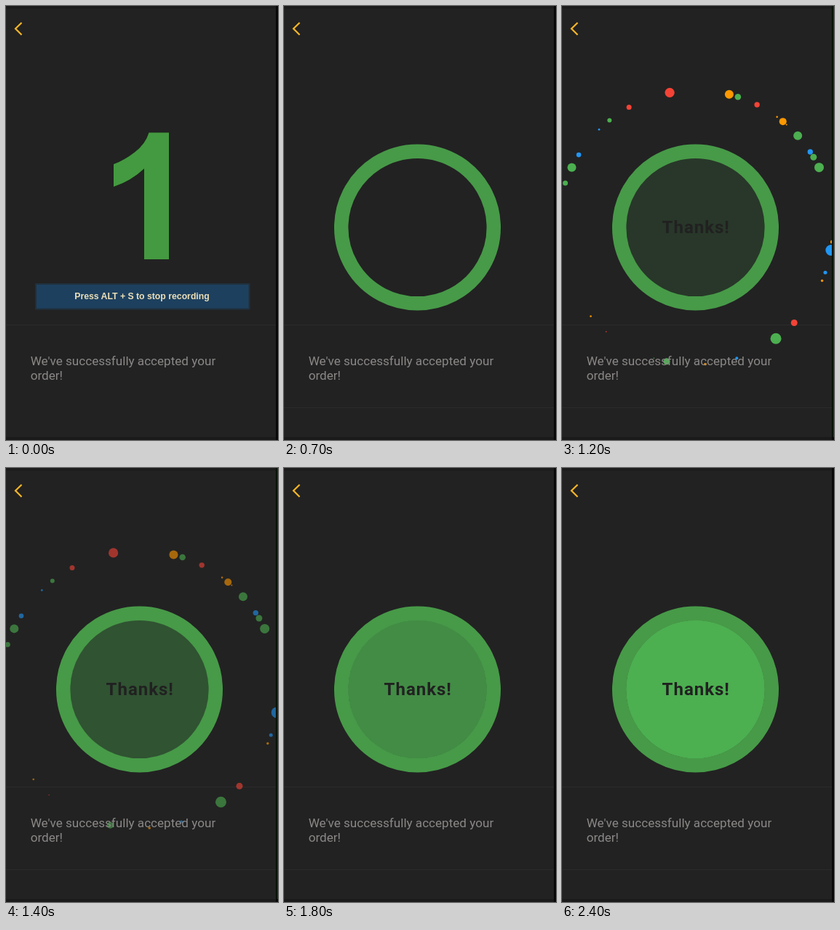
An HTML page that plays this animation: 374x598 px, repeating every 2500 ms.

```html
<!DOCTYPE html>
<html lang="en">
<head>
<meta charset="utf-8">
<title>Order accepted</title>
<style>
  html, body { margin: 0; width: 100%; height: 100%; overflow: hidden; background: #222; }
  svg { display: block; width: 374px; height: 598px; }
  .message { font: 17.1px Roboto, sans-serif; fill: #8b8887; }
  .thanks { font: bold 24px Roboto, sans-serif; letter-spacing: 1px; fill: #212121; }
  .hint { font: bold 12.25px "Liberation Sans", Arial, sans-serif; fill: #ecdfb8; text-anchor: middle; }
</style>
</head>
<body>
<svg viewBox="0 0 374 598">
  <rect width="374" height="598" fill="#222"/>
  <rect width="374" height="3.5" fill="#1b1b1b"/>
  <rect y="594" width="374" height="4" fill="#1a1a1a"/>
  <path d="M21.5 23 13 31.2l8.5 8.5" fill="none" stroke="#fbb726" stroke-width="2.2"/>
  <path id="divider" stroke="#2b2b2b"/>
  <path id="lowerDivider" d="M0 553.5H371" stroke="#2b2b2b"/>

  <g id="dots"></g>
  <circle id="disc" cx="183.5" cy="305" r="95.5" fill="#4caf50"/>
  <path id="ring" fill="none" stroke="#479a48" stroke-width="19.4"/>
  <text id="thanks" class="thanks" x="137.6" y="313">Thanks!</text>

  <text class="message" x="33.7" y="495">We've successfully accepted your</text>
  <text class="message" x="33.7" y="515">order!</text>

  <g id="countdown">
    <path d="M224 174.5V349H190V224Q172 241 148 249V218Q162 213 177 201.500 192 190 196.500 174.500Z"
          fill="#449a40" stroke="#1c281c" stroke-width="1.500" paint-order="stroke"/>
    <rect x="41" y="383" width="293.500" height="34.500" fill="#1d405f" stroke="#20303e" stroke-width="2"/>
    <text class="hint" x="187" y="404">Press ALT + S to stop recording</text>
  </g>

  <rect x="371" width="3" height="598" fill="#080808"/>
  <rect id="edge" x="372.500" width="1.500" height="594" fill="#063f06"/>
</svg>
<script>
const LOOP = 2500, STEP = 100;
const CENTER = { x: 183.5, y: 305 }, RING_RADIUS = 104.8, BURST_RADIUS = 192;

// Each dot: angle in degrees, radius
const BURST = {
  '#4caf50': [[-72, 4.3], [-41.9, 6], [-30.8, 4.5], [-25.9, 6.5], [54.2, 7.5], [102.1, 4.5],
              [107.6, .8], [-161.2, 3.5], [-154.1, 6], [-128.7, 3]],
  '#f44336': [[-100.8, 6.6], [-63.4, 3.7], [44.1, 4.5], [130.5, .8], [-118.9, 3.5]],
  '#ff9800': [[-75.8, 6], [-53.6, 1.3], [-50.5, 5], [-48.5, 1], [6.1, 2.5], [22.9, 1.7],
              [85.9, 1.8], [139.6, 1.3]],
  '#2196f3': [[-33.4, 3.7], [9.6, 7.5], [19.2, 2.5], [72.5, 2], [-148.1, 3.3], [-134.5, 1.4]]
};

const $ = id => document.getElementById(id);
const clamp = v => Math.max(0, Math.min(1, v));
const progress = (t, start, length) => clamp((t - start) / length);
const show = (id, visible) => $(id).setAttribute('visibility', visible ? 'visible' : 'hidden');

const dots = Object.entries(BURST).flatMap(([fill, list]) => list.map(([degrees, r]) => {
  const node = document.createElementNS('http://www.w3.org/2000/svg', 'circle');
  node.setAttribute('r', r);
  node.setAttribute('fill', fill);
  $('dots').append(node);
  return { node, angle: degrees * Math.PI / 180 };
}));

// Clockwise arc that starts at the bottom of the circle
function arcPath(part) {
  if (part <= 0) return '';
  const point = turn => {
    const a = Math.PI / 2 + turn * 2 * Math.PI;
    return `${CENTER.x + RING_RADIUS * Math.cos(a)} ${CENTER.y + RING_RADIUS * Math.sin(a)}`;
  };
  const arc = turn => `A${RING_RADIUS} ${RING_RADIUS} 0 0 1 ${point(turn)}`;
  return `M${point(0)}${arc(part / 3)}${arc(part * 2 / 3)}${arc(part)}${part === 1 ? 'Z' : ''}`;
}

function drawBurst(t) {
  const distance = BURST_RADIUS * (1 - Math.exp(-(t - 700) / 120));
  $('dots').setAttribute('opacity', 1 - progress(t, 1200, 500));
  show('dots', t > 700 && t < 1700);
  for (const { node, angle } of dots) {
    node.setAttribute('cx', CENTER.x + distance * Math.cos(angle));
    node.setAttribute('cy', CENTER.y + distance * Math.sin(angle));
  }
}

function render(t) {
  const sweep = (1 - Math.cos(Math.PI * progress(t, 190, 500))) / 2;
  const starting = t >= 100 && t < 700;

  show('countdown', t < 100);
  show('lowerDivider', t >= 700);
  show('thanks', t >= 1000);
  show('edge', (t >= 200 && t < 700) || (t >= 1200 && t < 1700) || (t >= 2100 && t < 2400));
  $('divider').setAttribute('d', `M${starting ? 30 : 0} 439.5H371`);
  $('ring').setAttribute('d', arcPath(sweep));
  $('disc').setAttribute('opacity', progress(t, 1050, 1000));
  drawBurst(t);
}

const origin = performance.now();
function tick() {
  const t = (performance.now() - origin) % LOOP;
  render(Math.floor(t / STEP) * STEP);
  requestAnimationFrame(tick);
}
tick();
</script>
</body>
</html>
```
